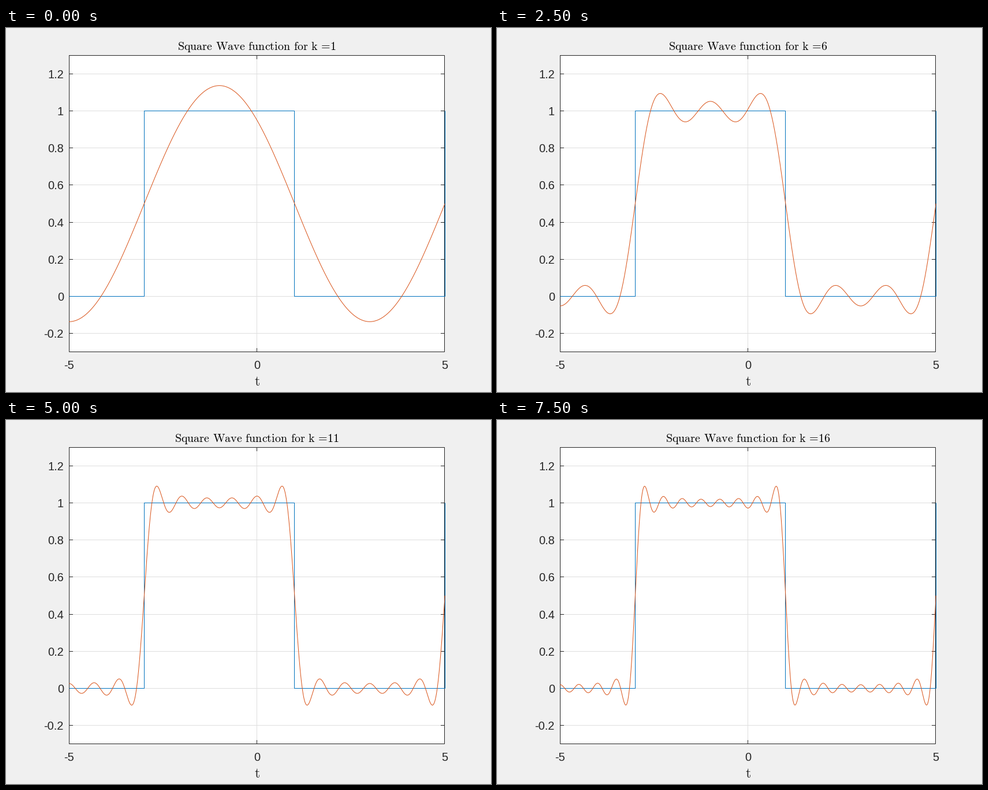
Animation of 840 by 630 pixels, one loop 8000 ms. Source, as a matplotlib script:

```python
import numpy as np
import matplotlib.pyplot as plt
from matplotlib.animation import FuncAnimation

W, H, DPI = 840, 630, 96
LEFT, TOP, WIDE, TALL = 109.2, 47.25, 651, 513.45
DARK, BLUE, ORANGE, GRID = "#262626", "#0072bd", "#d95319", "#dedede"
PX = 72 / DPI  # one pixel in points

plt.rcParams["mathtext.fontset"] = "cm"
plt.rcParams["font.family"] = "Liberation Sans"

fig = plt.figure(figsize=(W / DPI, H / DPI), dpi=DPI, facecolor="#f0f0f0")
ax = fig.add_axes([0, 0, 1, 1])
ax.set(xlim=(0, W), ylim=(H, 0))
ax.axis("off")


def to_x(t):
    return LEFT + (np.asarray(t) + 5) / 10 * WIDE


def to_y(v):
    return TOP + (1.3 - np.asarray(v)) / 1.6 * TALL


def mid(p):
    """Centre of the pixel that holds p."""
    return np.floor(p) + 0.5


def line(x, y, color, z, **kw):
    return ax.plot(x, y, color=color, lw=PX, zorder=z, snap=False, **kw)[0]


def label(x, y, s, size=20, color=DARK, ha="center"):
    return ax.text(x, y, s, fontsize=size * PX, color=color, ha=ha,
                   va="baseline", zorder=6)


def roman(s):
    """Roman math text with normal word spaces and a tight equals sign."""
    s = s.replace(" =", r"\hspace{0.18}=\hspace{-0.2}")
    return r"$\mathrm{%s}$" % s.replace(" ", r"\hspace{0.38}")


def partial_sum(t, k):
    total = np.full_like(t, 0.5)
    for n in range(1, k + 1, 2):
        sign = (-1) ** (n // 2)
        total += sign * 2 / (n * np.pi) * np.cos(n * np.pi / 4 * (t + 1))
    return total


# Axes frame, grid and ticks
x0, x1, y0, y1 = 109.5, 759.5, 47.5, 560.5
ax.fill([x0, x1, x1, x0], [y0, y0, y1, y1], color="white", lw=0, zorder=0)

for v in np.arange(-1, 7) / 5:
    y = mid(to_y(v))
    line([x0, x1], [y, y], GRID, 1)
    line([x0, x0 + 6], [y, y], DARK, 2)
    line([x1 - 6, x1], [y, y], DARK, 2)
    label(100, y + 7.5, f"{v:g}", ha="right")

xc = mid(to_x(0))
line([xc, xc], [y0, y1], GRID, 1)
line([xc, xc], [y0, y0 + 6], DARK, 2)
line([xc, xc], [y1 - 6, y1], DARK, 2)
for t in (-5, 0, 5):
    label(to_x(t), 590, str(t))
line([x0, x1, x1, x0, x0], [y0, y0, y1, y1, y0], DARK, 2,
     solid_joinstyle="miter", solid_capstyle="projecting")

label(434.7, 619, roman("t"), size=24)
title = label(434.7, 38, "", color="black")

# Square wave and its series
step_t = np.array([-5, -3, -3, 1, 1, 5, 5])
step_v = np.array([0, 0, 1, 1, 0, 0, 1])
line(mid(to_x(step_t)), mid(to_y(step_v)), BLUE, 3,
     solid_joinstyle="miter", solid_capstyle="butt")

ts = np.linspace(-5, 5, 1301)
curve = line(to_x(ts), to_y(partial_sum(ts, 1)), ORANGE, 4,
             solid_capstyle="butt")


def update(i):
    k = i + 1
    curve.set_ydata(to_y(partial_sum(ts, k)))
    title.set_text(roman(f"Square Wave function for k ={k}"))
    return curve, title


anim = FuncAnimation(fig, update, frames=16, interval=500, repeat=True,
                     repeat_delay=0, blit=False)
plt.show()
```
